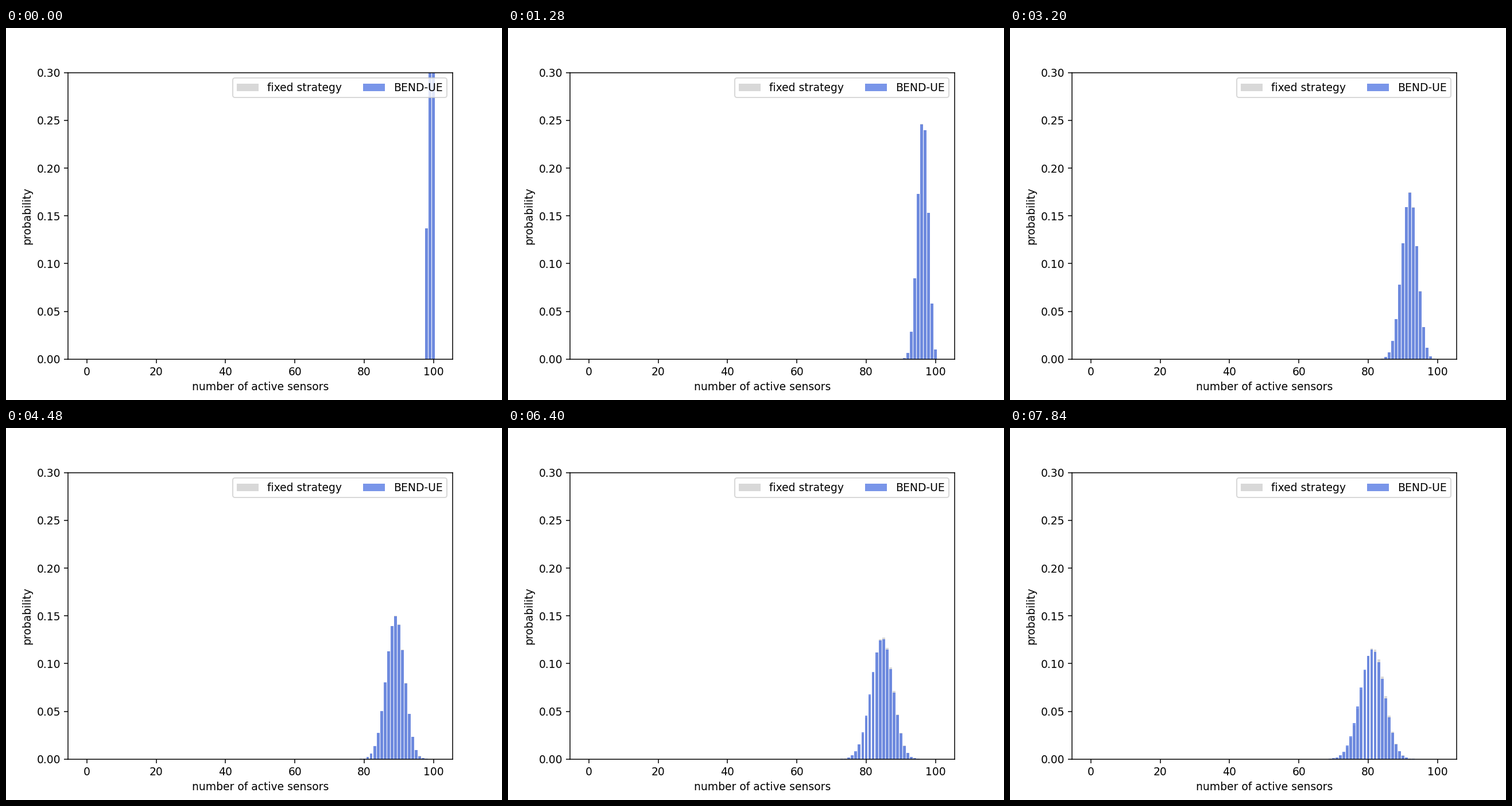
These frames come from a looping animation (864x648 px, 8 s). A matplotlib script:

```python
import numpy as np
import matplotlib.pyplot as plt
from matplotlib.animation import FuncAnimation

SENSORS = 100
FRAMES = 50
FIRST_SLOT = 2  # time slots already elapsed in the first frame

counts = np.arange(SENSORS + 1)


def success(tx):
    """Chance that exactly one of the active sensors transmits."""
    return counts * tx * (1 - tx) ** np.maximum(counts - 1, 0)


def evolve(p):
    """Distribution of active sensors per slot; a success removes one sensor."""
    dist = np.zeros(SENSORS + 1)
    dist[SENSORS] = 1
    history = [dist]
    for _ in range(FIRST_SLOT + FRAMES):
        moved = dist * p
        dist = dist - moved
        dist[:-1] += moved[1:]
        history.append(dist)
    return history


fixed = evolve(success(1 / SENSORS))
adaptive = evolve(success(1 / np.maximum(counts, 1)))

fig, ax = plt.subplots(figsize=(6.4, 4.8), dpi=135)
zeros = np.zeros(SENSORS + 1)
fixed_bars = ax.bar(counts, zeros, color="gray", alpha=0.3,
                    label="fixed strategy")
adaptive_bars = ax.bar(counts, zeros, color="royalblue", alpha=0.7,
                       label="BEND-UE")
ax.set_xlim(-5.44, 105.44)
ax.set_ylim(0, 0.3)
ax.set_xlabel("number of active sensors")
ax.set_ylabel("probability")
ax.legend(loc="upper right", ncol=2)


def update(frame):
    slot = frame + FIRST_SLOT
    for bars, history in ((fixed_bars, fixed), (adaptive_bars, adaptive)):
        for bar, height in zip(bars, history[slot]):
            bar.set_height(height)
    return [*fixed_bars, *adaptive_bars]


anim = FuncAnimation(fig, update, frames=FRAMES, interval=160,
                     init_func=lambda: update(0), repeat=True, repeat_delay=0)
plt.show()
```
